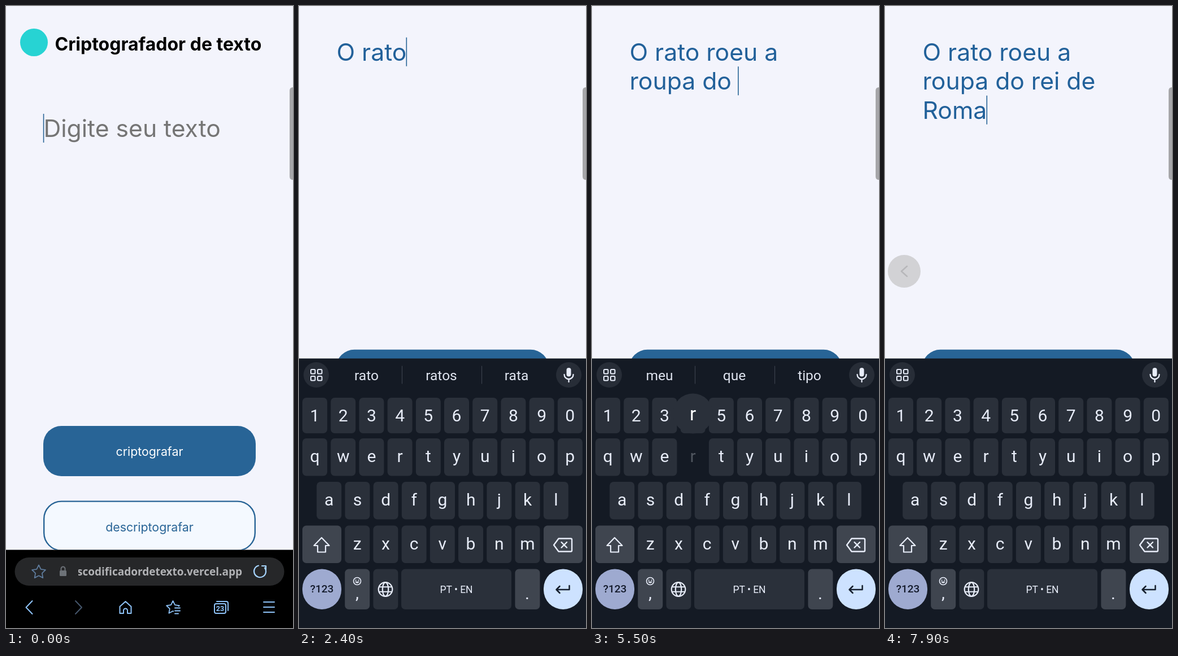
Write an HTML page that moves like this. It is 508 px wide and 1102 px high and loops after 8000 ms.

```html
<!DOCTYPE html>
<html lang="pt">
<head>
<meta charset="utf-8">
<title>Criptografador de texto</title>
<style>
  html, body { margin: 0; width: 100%; height: 100%; overflow: hidden; background: #f3f4fc; }
  svg { display: block; width: 508px; height: 1102px; }
  text { white-space: pre; font-optical-sizing: none; }
  .field { font: 400 42.67px Inter, sans-serif; }
  .title { font: 700 32px Inter, sans-serif; }
  .button { font: 400 21.33px Inter, sans-serif; }
  .url { font: 600 19px "Noto Sans", sans-serif; }
  .key { font: 400 30px Roboto, sans-serif; }
  .popup { font: 400 33px Roboto, sans-serif; }
  .hint { font: 400 24.5px Roboto, sans-serif; }
  .mode { font: 500 19px Roboto, sans-serif; }
  .lang { font: 400 17.5px Roboto, sans-serif; }
  .tabs { font: 700 12.5px Roboto, sans-serif; }
</style>
</head>
<body>
<svg viewBox="0 0 508 1102"><text id="probe" class="field" visibility="hidden"></text><g id="scene"></g></svg>
<script>
const LOOP = 8000, STEP = 100;
const BG = '#f3f4fc', BLUE = '#286496', NAV = '#8fc4fa';
const BOARD = '#141a24', KEY = '#2a303a', SPECIAL = '#3f454f', INK = '#e8edf9';
const SENTENCE = 'O rato roeu a roupa do rei de Roma';
const FIELD_X = 66.5, FIELD_WIDTH = 376, LINE = 51.5;

// Time at which each character's key goes down, in steps.
const PRESSES = [12, 14, 16, 20, 22, 23, 25, 26, 27, 28, 32, 33, 36, 38, 39, 41, 42,
  43, 44, 46, 47, 48, 49, 55, 57, 58, 60, 61, 62, 64, 68, 70, 71, 72];
const SHIFT_ON = 66, SHIFT_OFF = 69, HINTS_OFF = 79, PAGE_SCROLLS = 4;

// Suggestions after each character.
const HINTS = ['O Os Oi', 'cara que meu', 'r rs eu', 'ra rápido raiva', 'rat rato ratos',
  'rato ratos rata', 'que é do', 'r roeu rio', 'ro rosto roeu', 'roe roeu roer',
  'roeu Nelvo doeu', 'a o as', 'a as à', 'roupa casa minha', 'r roupa rua',
  'ro roupa rosto', 'rou roupa roubo', 'roup roupa roupas', 'roupa roupas rouca',
  'de que do', 'd de do', 'do dos dor', 'meu que tipo', 'r rei rio', 're rei rede',
  'rei reis reino', 'que do de', 'd de do', 'de dele dela', 'maracujá ontem novo',
  'R Rua Rio', 'Ro Rosa Rota', 'Rom Roma Romã', 'Roma Romã Romano'];

const probe = document.getElementById('probe');
const scene = document.getElementById('scene');

const widthOf = s => (probe.textContent = s, s ? probe.getComputedTextLength() : 0);
const rect = (x, y, w, h, r, fill, more = '') =>
  `<rect x="${x}" y="${y}" width="${w}" height="${h}" rx="${r}" fill="${fill}" ${more}/>`;
const disc = (x, y, r, fill, more = '') => `<circle cx="${x}" cy="${y}" r="${r}" fill="${fill}" ${more}/>`;
const line = (d, color, width = 2, fill = 'none') =>
  `<path d="${d}" fill="${fill}" stroke="${color}" stroke-width="${width}" stroke-linejoin="round" stroke-linecap="round"/>`;
const escapeText = s => s.replace(/&/g, '&amp;').replace(/</g, '&lt;');
const text = (s, x, y, cls, fill, anchor = 'middle') =>
  `<text x="${x}" y="${y}" class="${cls}" fill="${fill}" text-anchor="${anchor}">${escapeText(s)}</text>`;

function star(cx, cy, radius, color) {
  const points = Array.from({ length: 10 }, (_, i) => {
    const r = i % 2 ? radius * 0.5 : radius, a = (i / 5 - 0.5) * Math.PI;
    return `${(cx + r * Math.cos(a)).toFixed(1)} ${(cy + r * Math.sin(a)).toFixed(1)}`;
  });
  return line(`M${points.join('L')}Z`, color, 1.8);
}

const smiley = (x, y, r, w) => disc(x, y, r, 'none', `stroke="${INK}" stroke-width="${w}"`) +
  disc(x - r * .38, y - r * .25, r * .16, INK) + disc(x + r * .38, y - r * .25, r * .16, INK) +
  line(`M${x - r * .5} ${y + r * .2}a${r * .55} ${r * .5} 0 0 0 ${r} 0z`, INK, w * .5, INK);

function wrap(typed) {
  const lines = [''];
  for (const word of typed.match(/\S+ ?/g) || []) {
    const last = lines[lines.length - 1];
    if (last && widthOf((last + word).trimEnd()) > FIELD_WIDTH) lines.push(word);
    else lines[lines.length - 1] += word;
  }
  return lines;
}

function field(typed, top) {
  const lines = wrap(typed), base = top + 41.3;
  const end = lines.length - 1;
  const caretX = FIELD_X + widthOf(lines[end]), caretY = top + end * LINE;
  return (typed
    ? lines.map((s, i) => text(s, FIELD_X, base + i * LINE, 'field', '#22619a', 'start')).join('')
    : text('Digite seu texto', FIELD_X, base, 'field', '#757575', 'start')) +
    rect(caretX - .75, caretY, 1.6, 51, 0, BLUE);
}

function page(typed, scroll) {
  return rect(0, 0, 508, 1102, 0, BG) +
    `<clipPath id="view"><path d="M0 0H508V${scroll ? 625.5 : 963.5}H0Z"/></clipPath>
    <g clip-path="url(#view)"><g transform="translate(0 ${-scroll})">` +
    disc(49.5, 64.5, 24.5, '#27d3d3') +
    text('Criptografador de texto', 86.5, 79, 'title', '#000', 'start') +
    field(typed, 191) +
    rect(66, 744, 376, 89, 32, BLUE) + text('criptografar', 254, 796.5, 'button', '#fff') +
    rect(67.2, 877.6, 373.6, 87, 31, '#f4f9ff', `stroke="${BLUE}" stroke-width="2.4"`) +
    text('descriptografar', 254, 930.5, 'button', BLUE) +
    '</g></g>' + line('M512 144H508Q502 144 502 150V302Q502 308 508 308H512Z', 'none', 0, '#a6a6a9');
}

function browserBar() {
  return rect(0, 963.5, 508, 139, 0, '#000') + rect(15.5, 977, 477, 50, 25, '#262729') +
    star(58, 1003, 12.5, '#5f7c9d') +
    rect(95, 1000, 12, 10, 1.5, '#6d7278') + line('M97.5 1000v-3a3.5 3.5 0 0 1 7 0v3', '#6d7278') +
    '<clipPath id="address"><path d="M128 980H420V1024H128Z"/></clipPath><g clip-path="url(#address)">' +
    text('transcodificadordetexto.vercel.app', 418, 1009, 'url', '#b1b2b5', 'end') + '</g>' +
    line('M447 991.5a10.5 10.5 0 1 0 11 4M453 992h7v7', '#a6d4ff', 2.2) +
    line('M46.5 1054L35.5 1065.5L46.5 1077', NAV) + line('M123 1054L134 1065.5L123 1077', '#45566c') +
    line('M201.5 1064L211.5 1055L221.5 1064V1076H215V1071a3.5 3.5 0 0 0-7 0V1076H201.5Z', NAV) +
    star(295.5, 1066, 12, NAV) + rect(297, 1064, 13, 15, 0, '#000') +
    line('M299 1066.5h9M299 1071.5h9M299 1076.5h6', NAV) +
    rect(369, 1059, 20, 17, 3, 'none', `stroke="${NAV}" stroke-width="2"`) +
    line('M373 1055H390q3 0 3 3V1071', NAV) + text('23', 379, 1072, 'tabs', NAV) +
    line('M456 1056h19M456 1065h19M456 1074h19', NAV);
}

function toolbar(hints, started) {
  let out = disc(30.5, 653.5, 22.5, '#272d37') + disc(477.5, 653.5, 22.5, '#272d37');
  for (const x of [21, 33]) for (const y of [644, 656])
    out += rect(x, y, 7.5, 7.5, 1.5, 'none', `stroke="${INK}" stroke-width="2"`);
  out += rect(473.5, 641, 8, 15.5, 4, INK) + line('M469.5 653a8 8 0 0 0 16 0M477.5 661v5', INK, 2.3);
  if (hints) {
    out += hints.map((s, i) => text(s, [119.5, 252, 385][i], 662.5, 'hint', '#dfe4ef')).join('');
    out += line('M182.5 638V669M323.5 638V669', '#3a414c', 1.2);
  } else if (!started) {
    out += smiley(105, 654, 11, 2.4) +
      rect(171, 645, 18, 19, 1.5, 'none', `stroke="${INK}" stroke-width="2.4"`) +
      rect(175, 641.5, 10, 6, 2, INK) + line('M175 651.5h10M175 655.5h10M175 659.5h6', INK, 1.8) +
      disc(254, 654, 5.8, 'none', `stroke="${INK}" stroke-width="5"`) +
      disc(254, 654, 9, 'none', `stroke="${INK}" stroke-width="4" stroke-dasharray="5.4 4.025" stroke-dashoffset="2.7"`) +
      line('M325 664H318.5V644H338V655', INK, 2.4) +
      line('M325 652l4 3v-7l4 6h5v11h-7z', INK, 1.5, INK) +
      rect(390, 644.5, 25, 19.5, 1.5, 'none', `stroke="${INK}" stroke-width="2.4"`) +
      line('M395 653v-4h4M410 655.5v4h-4', INK, 2.2);
  }
  return out;
}

function keyboard({ hints, started, upper, symbols, pressed, offset }) {
  const rows = [
    [symbols ? '!@#$%^&*()' : '1234567890', 6, 694, 63],
    ['qwertyuiop', 6, 766, 66.5],
    ['asdfghjkl', 31.2, 843, 66.5],
    ['zxcvbnm', 81.2, 920.5, 66.5]
  ];
  let keys = '', popup = '';
  rows.forEach(([chars, left, y, h], row) => [...chars].forEach((c, i) => {
    const x = left + 50.2 * i, mid = x + 22, label = upper ? c.toUpperCase() : c;
    const down = c === pressed;
    const base = row ? y + (upper ? 44 : 42) : y + 42;
    if (!down) keys += rect(x, y, 44, h, 7, KEY);
    keys += text(label, mid, base, 'key', down ? '#50565f' : INK);
    if (down) popup = disc(mid, y - 44, 35.5, KEY) + text(label, mid, y - 32, 'popup', '#fff');
  }));
  const shift = 'M40 942L53.5 956H47V967.5H33V956H26.5Z';
  const special = rect(6, 920.5, 69, 66.5, 7, SPECIAL) + line(shift, INK, 2.2, upper ? INK : 'none') +
    rect(433, 920.5, 69, 66.5, 7, SPECIAL) +
    line('M459.5 943.5H481q2 0 2 2V964.5q0 2-2 2H459.5L451 955ZM464.5 950l9.5 9.5M474 950l-9.5 9.5', INK, 2.4) +
    rect(6, 997.5, 69, 71.5, 34.5, '#9eaad0') + text('?123', 40.5, 1039, 'mode', '#141b2c') +
    rect(81.2, 997.5, 44, 71.5, 7, SPECIAL) + smiley(103, 1019, 6.5, 1.6) + text(',', 103, 1050, 'key', INK) +
    rect(131.4, 997.5, 44, 71.5, 7, KEY) +
    disc(153, 1033.5, 12.3, 'none', `stroke="${INK}" stroke-width="2.2"`) +
    `<ellipse cx="153" cy="1033.5" rx="5.2" ry="12.3" fill="none" stroke="${INK}" stroke-width="2.2"/>` +
    line('M142 1029.3h22M142 1037.7h22', INK, 2.1) +
    rect(181, 997.5, 195, 71.5, 7, pressed === ' ' ? SPECIAL : KEY) + text('PT • EN', 278.5, 1039.5, 'lang', INK) +
    rect(382.4, 997.5, 44, 71.5, 7, SPECIAL) + text('.', 404, 1051, 'key', INK) +
    rect(433, 997.5, 69, 71.5, 34.5, '#cde2ff') +
    line('M478.5 1027V1034H456M461.5 1028L455.5 1034L461.5 1040', '#17202e', 2.5);
  return `<g transform="translate(0 ${offset})">` + rect(0, 624.5, 508, 478, 0, BOARD) +
    toolbar(hints, started) + keys + special + popup + '</g>';
}

function draw(step) {
  // A character is entered on release, one step after its key goes down.
  const count = PRESSES.filter(at => step > at).length;
  const active = PRESSES.indexOf(step);
  const shifted = step >= SHIFT_ON && step < SHIFT_OFF;
  const scroll = step < PAGE_SCROLLS ? 0 : step < 6 ? 134 : 135.3;
  const words = count ? HINTS[count - 1].split(' ') : null;
  const hints = words && step < HINTS_OFF
    ? words.map(w => shifted ? w[0].toUpperCase() + w.slice(1) : w) : null;

  let out = page(SENTENCE.slice(0, count), scroll);
  if (!scroll) out += browserBar();
  if (step >= 3) out += keyboard({
    hints, started: count > 0, symbols: shifted, upper: !count || shifted,
    pressed: active < 0 ? '' : SENTENCE[active].toLowerCase(),
    offset: step < 8 ? 477 * Math.exp(-(step * STEP - 260) / 79) : 0
  });
  if (step >= HINTS_OFF) out += disc(34, 470, 29, '#d2d2d5') + line('M39 461L29 470L39 479', '#b7b7ba', 2.5);
  scene.innerHTML = out;
}

let shown = -1;
function tick() {
  const step = Math.floor(performance.now() % LOOP / STEP);
  if (step !== shown) draw(shown = step);
  requestAnimationFrame(tick);
}
tick();
</script>
</body>
</html>
```
